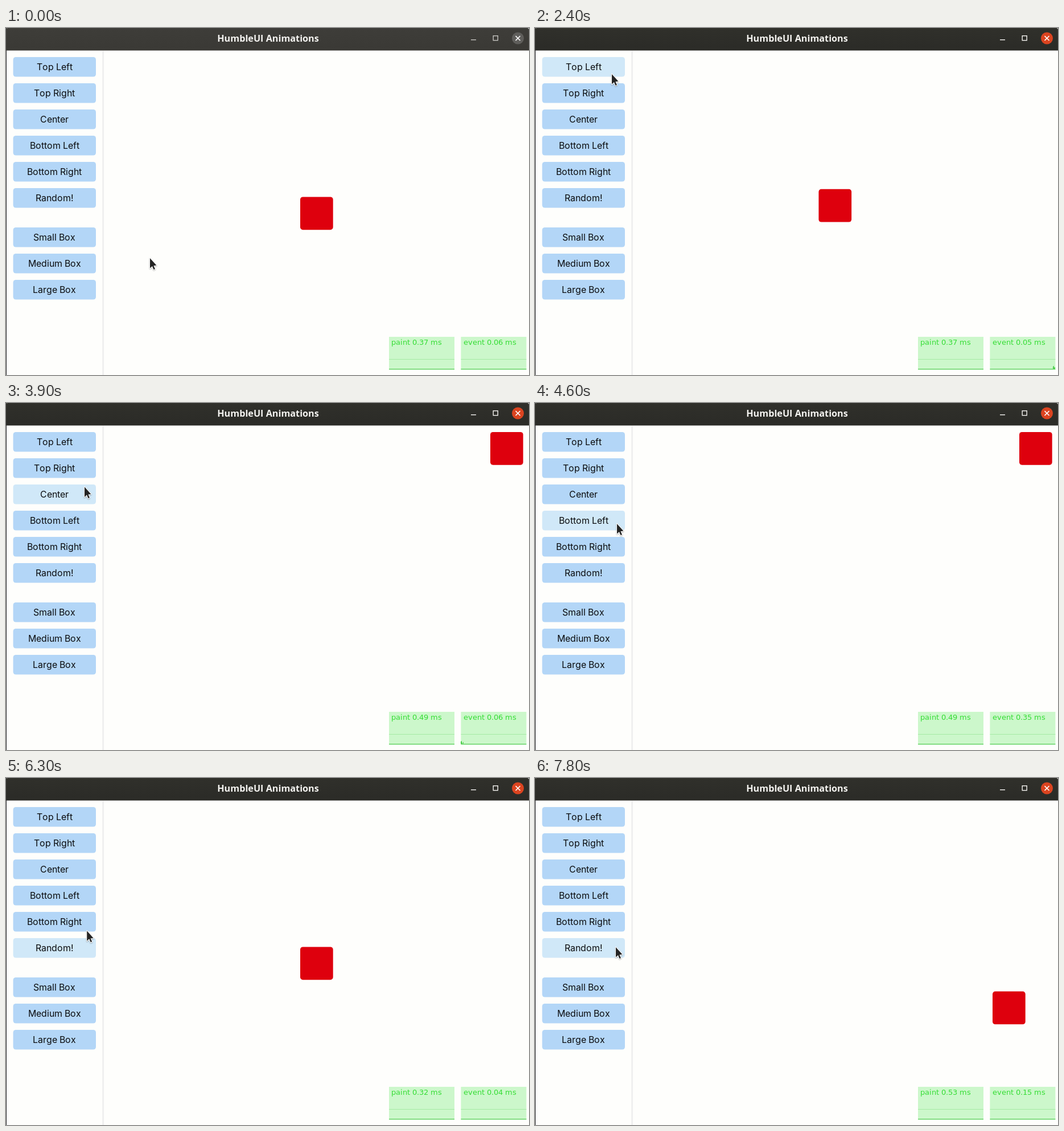
Animation of 919x609 px, one loop 8 s. Source, as an HTML page with a canvas:

```html
<!DOCTYPE html>
<html lang="en">
<head>
<meta charset="utf-8">
<title>HumbleUI Animations</title>
<style>
  html, body { margin: 0; width: 100%; height: 100%; overflow: hidden; background: #fefefc; }
  canvas { display: block; }
</style>
</head>
<body>
<canvas id="stage" width="919" height="609"></canvas>
<script>
const ctx = document.getElementById('stage').getContext('2d');
const LOOP = 8000, STEP = 100, BOX_MS = 300, HOVER_LEAD = 45, FOCUS_AT = 2300;

const BOX = 57.7, LEFT = 183, RIGHT = 851, TOP = 51, BOTTOM = 541.9;
const CENTER = [(LEFT + RIGHT) / 2, (TOP + BOTTOM) / 2];
const BUTTON = { x: 12.6, w: 145.4, h: 34.5, pitch: 46, gap: 23 };

const buttons = ['Top Left', 'Top Right', 'Center', 'Bottom Left', 'Bottom Right', 'Random!',
  'Small Box', 'Medium Box', 'Large Box']
  .map((label, i) => ({ label, y: TOP + i * BUTTON.pitch + (i > 5 ? BUTTON.gap : 0) }));

const glide = (start, end, x, y) => ({ start, end, to: [x, y] });
const send = (start, x, y) => glide(start, start + BOX_MS, x, y);

const pointerPath = [
  glide(-1, 0, 252, 403), glide(500, 600, 249, 274), glide(700, 900, 142, 204),
  glide(1200, 1800, 134, 80), glide(3000, 3200, 134, 114), glide(3700, 4300, 143, 211),
  glide(5100, 5400, 142, 160), glide(6000, 6380, 141, 296)
];

const boxPath = [
  send(-BOX_MS, ...CENTER), send(2350, LEFT, TOP), send(3420, RIGHT, TOP), send(4600, LEFT, BOTTOM),
  send(5650, ...CENTER), send(6700, 450, 455), send(7450, 804, 374.6)
];

// time, paint ms, event ms
const readings = [[0, 0.37, 0.06], [1300, 0.56, 0.08], [3100, 0.49, 0.06], [4600, 0.49, 0.35],
  [5200, 0.45, 0.07], [6100, 0.32, 0.04], [7400, 0.53, 0.15]];

const linear = p => p;
const easeInOut = p => p < 0.5 ? 2 * p * p : 1 - 2 * (1 - p) ** 2;
const noise = n => { const v = Math.sin(n * 12.9898) * 43758.5453; return v - Math.floor(v); };
const progress = (leg, t) => Math.min(1, Math.max(0, (t - leg.start) / (leg.end - leg.start)));

function along(path, t, ease) {
  return path.reduce((pos, leg) => {
    const p = ease(progress(leg, t));
    return pos.map((v, i) => v + (leg.to[i] - v) * p);
  }, path[0].to);
}

const activeMs = (path, t) =>
  path.reduce((sum, leg) => sum + progress(leg, t) * (leg.end - leg.start), 0);

// The event graph takes a sample per painted frame and more per pointer event.
const samples = t => 0.06 * activeMs(boxPath, t) + 0.195 * activeMs(pointerPath, t);

function readingAt(t) {
  const [, paint, event] = readings.filter(r => r[0] <= t).pop();
  const moving = boxPath.some(leg => t > leg.start && t < leg.end);
  return moving ? [0.34 + 0.24 * noise(t / STEP), 0.04 + 0.09 * noise(t / STEP + 99)] : [paint, event];
}

function hoveredAt(t) {
  const [x, y] = along(pointerPath, t, linear);
  return buttons.find(b => x > BUTTON.x && x < BUTTON.x + BUTTON.w && y >= b.y && y < b.y + BUTTON.h);
}

function rect(x, y, w, h, color) {
  ctx.fillStyle = color;
  ctx.fillRect(x, y, w, h);
}

function roundRect(x, y, w, h, r, color) {
  ctx.fillStyle = color;
  ctx.beginPath();
  ctx.roundRect(x, y, w, h, r);
  ctx.fill();
}

// Sets glyphs on whole pixels, as hinted text is laid out.
function hintedText(str, x, y, font, color, centered) {
  ctx.font = font;
  ctx.fillStyle = color;
  const advances = [...str].map(ch => Math.round(ctx.measureText(ch).width));
  const width = advances.reduce((a, b) => a + b);
  let pen = Math.round(centered ? x - width / 2 : x);
  [...str].forEach((ch, i) => {
    ctx.fillText(ch, pen, y);
    pen += advances[i];
  });
}

function titleBar(focused) {
  const shade = ctx.createLinearGradient(0, 0, 0, 40);
  shade.addColorStop(0, focused ? '#30302b' : '#3e3d39');
  shade.addColorStop(1, focused ? '#2b2b27' : '#3a3935');
  roundRect(0, 0, 919, 39.6, [3, 3, 0, 0], shade);

  ctx.font = 'bold 16.2px "Open Sans", sans-serif';
  ctx.fillStyle = '#f4f3f0';
  ctx.textAlign = 'center';
  ctx.fillText('HumbleUI Animations', 460.5, 24.3);
  ctx.textAlign = 'left';

  const ink = focused ? '#f4f3f0' : '#c4c3bf';
  rect(817, 20, 9, 1.4, ink);
  ctx.strokeStyle = ink;
  ctx.lineWidth = 1.4;
  ctx.strokeRect(856.2, 13.7, 8, 8);

  ctx.fillStyle = focused ? '#db4420' : '#5f5e5b';
  ctx.beginPath();
  ctx.arc(899.5, 18, 10.5, 0, Math.PI * 2);
  ctx.fill();
  ctx.strokeStyle = '#fff';
  ctx.lineWidth = 1.7;
  ctx.beginPath();
  for (const dir of [-1, 1]) {
    ctx.moveTo(899.5 - 4 * dir, 14);
    ctx.lineTo(899.5 + 4 * dir, 22);
  }
  ctx.stroke();
}

function meter(x, label, value) {
  rect(x, 542, 115, 57.5, '#ccf7cb');
  rect(x, 581, 115, 1, '#a5eba5');
  rect(x, 598, 115, 1.4, '#62d262');
  hintedText(`${label} ${value.toFixed(2)} ms`, x + 4.2, 556, '13px "DejaVu Sans", sans-serif', '#35dd35');
}

function spike(t) {
  const x = 914 - Math.round(samples(t) - samples(FOCUS_AT));
  if (t < FOCUS_AT || x < 800) return;
  [4, 5, 2, 0, 3].forEach((h, i) => rect(Math.min(x + i - 1, 913), 598 - h, 1, h, '#4fd04f'));
}

function arrow(x, y) {
  const shape = [[1, 1], [1, 18.6], [5, 15], [7.5, 21], [10, 20], [7.4, 14.2], [12.4, 13.6]];
  ctx.beginPath();
  shape.forEach(([dx, dy]) => ctx.lineTo(x + dx, y + dy));
  ctx.closePath();
  ctx.save();
  ctx.shadowColor = 'rgba(0,0,0,.3)';
  ctx.shadowBlur = 2;
  ctx.shadowOffsetY = 1;
  ctx.lineJoin = 'round';
  ctx.lineWidth = 2.2;
  ctx.strokeStyle = '#fff';
  ctx.stroke();
  ctx.restore();
  ctx.fillStyle = '#242424';
  ctx.fill();
}

function draw(t) {
  const [paint, event] = readingAt(t);
  const hovered = hoveredAt(t + HOVER_LEAD);

  rect(0, 0, 919, 609, '#fefefc');
  rect(0, 0, 1, 609, '#252529');
  titleBar(t >= FOCUS_AT);
  rect(169.3, 40, 2.6, 569, '#eeeeee');

  for (const button of buttons) {
    const { label, y } = button;
    roundRect(BUTTON.x, y, BUTTON.w, BUTTON.h, 4.6, button === hovered ? '#d0e8f8' : '#b3d6f7');
    hintedText(label, 85.2, y + 23, '15.9px Inter, sans-serif', '#0b0c0e', true);
  }

  roundRect(...along(boxPath, t, easeInOut), BOX, BOX, 4.6, '#de000d');
  meter(673, 'paint', paint);
  meter(799.4, 'event', event);
  spike(t);
  arrow(...along(pointerPath, t, linear));
}

function tick() {
  const t = performance.now() % LOOP;
  draw(Math.floor(t / STEP) * STEP);
  requestAnimationFrame(tick);
}
tick();
</script>
</body>
</html>
```
